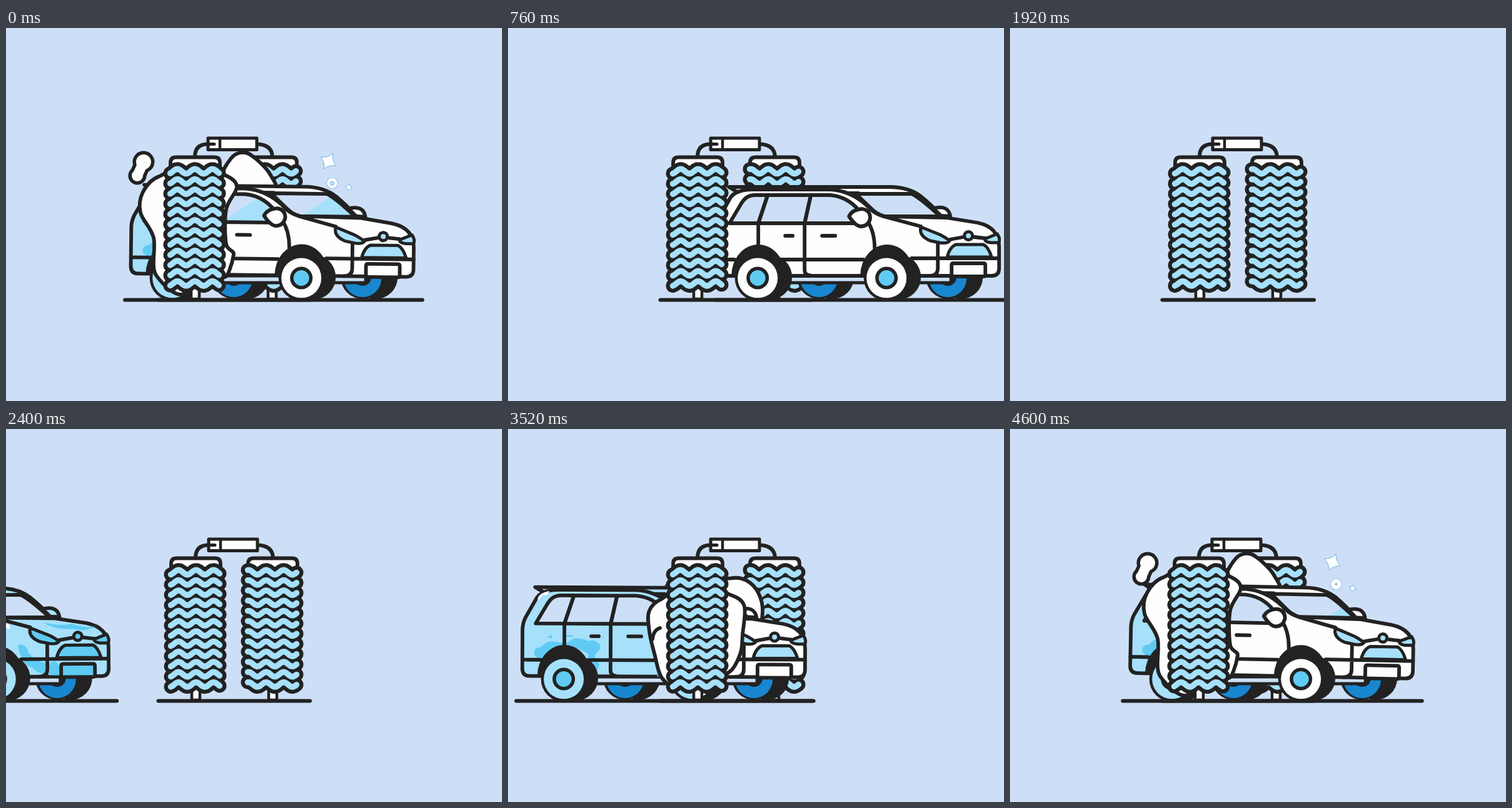
Animation, 793 px wide and 596 px high, one loop 4.64 s. Source, as an HTML page with a canvas:

```html
<!DOCTYPE html>
<html lang="en">
<head>
<meta charset="utf-8">
<title>Car wash</title>
<style>
html, body { margin: 0; width: 100%; height: 100%; overflow: hidden; background: #cddff7; }
canvas { display: block; }
</style>
</head>
<body>
<canvas id="stage" width="793" height="596"></canvas>
<script>
const ctx = document.getElementById('stage').getContext('2d');
const LOOP = 4640, WRAP = 2000, BRUSH_X = 303;
const BG = '#cddff7', INK = '#222222', WHITE = '#fefefe';
const LIGHT = '#a6e0fb', CYAN = '#5fcbf3', DEEP = '#1887cf';

const CLEAN = { paint: WHITE, trim: LIGHT, plate: WHITE };
const DIRTY = { paint: LIGHT, trim: CYAN, plate: CYAN };

// Car shapes are laid out with the front wheel at x = 605.
const HOME = 605;
const P = d => new Path2D(d);
const BODY = P('M333 322Q333 312 338 302L355 272Q363 258 392 258H515Q548 260 574 284Q588 300 605 301L700 303L750 311Q785 318 785 350V384Q785 396 773 396H345Q333 396 333 384Z');
const ROOF = P('M353 254H610Q640 254 660 269Q676 282 694 301H600L560 264H370Z');
const SCREEN = P('M556 265H645Q657 270 691 301L603 301Q590 299 577 285Z');
const REAR_GLASS = P('M354 312L373 280Q381 267 394 267H415L400 312Z');
const MID_GLASS = P('M415 267H484L474 312H400Z');
const FRONT_GLASS = P('M484 267H515Q548 270 567 300L574 312H474Z');
const SEAMS = P('M400 312V350M474 312V386Q474 395 482 395M574 308Q586 325 586 352M333 370H362M438 370H568M645 368H785M687 343V384Q687 396 674 396M600 301L660 317M706 338L728 334M745 334L763 336');
const HANDLES = P('M443 332H455M502 332H523');
const HEADLIGHTS = P('M660 318Q656 332 675 340L690 343Q702 345 706 340Q700 335 690 330ZM762 337L782 329Q788 338 784 343H772Q762 342 762 337Z');
const GRILLE = P('M702 366Q706 350 716 346H760Q768 350 773 366Z');
const PLATE = P('M712 376H760Q763 376 763 379V394Q763 397 760 397H712Q709 397 709 394V379Q709 376 712 376Z');
const FAR_MIRROR = P('M680 288Q704 282 707 301L692 300Z');
const MIRROR = P('M545 301Q550 290 566 289Q579 291 579 304Q576 317 564 317Q556 317 545 301Z');
const STAINS = P('M352 362Q350 350 362 350Q372 338 386 341Q404 346 414 336Q428 334 438 340Q448 336 456 344Q460 352 452 358Q446 364 452 370Q460 378 452 386L438 392V360Q395 332 362 372ZM372 334L380 330V336ZM400 333Q408 327 416 333ZM555 345Q562 330 580 336Q600 345 586 358Q574 370 566 396H548Q558 380 550 372Q564 366 555 345ZM680 309Q706 316 728 312Q748 320 764 316Q748 326 728 320Q700 322 680 309ZM640 345Q654 342 656 356Q668 372 684 374V392Q668 390 664 382Q646 378 640 345ZM690 376Q700 366 706 380V394H690Z');
const SHINES = P('M357 276Q356 264 376 260Q372 270 366 266ZM606 306Q630 308 627 320Q616 316 606 306ZM560 258H585L575 262Z');

// time, front wheel x, body tilt, left end of the road
const POSE = [
  [2400, -17, -.008, -280], [3080, 229, -.013, -282], [3960, 361, .022, -284],
  [4600, 465, .02, -286], [4640, 472, .012, -283], [5400, 605, 0, -275]
];
const FOAM_TIMES = [3080, 3960, 4600];
const FOAM_LEFT = [
  [290,315, 258,318, 236,338, 227,365, 234,392, 258,408, 290,408],
  [258,223, 232,226, 215,245, 225,282, 234,325, 236,390, 264,406],
  [290,236, 245,237, 219,262, 215,295, 236,335, 240,395, 290,416]
];
const FOAM_RIGHT = [
  [320,290, 352,290, 376,308, 384,338, 370,362, 350,378, 320,378],
  [320,225, 354,238, 379,256, 366,320, 373,355, 358,398, 320,405],
  [320,232, 352,236, 369,254, 352,290, 352,345, 364,362, 345,392]
];
const FOAM_BACK = [
  [330,265, 354,260, 378,275, 393,305, 405,340, 390,380, 330,390],
  [345,235, 360,217, 384,209, 407,218, 409,245, 403,263, 375,255],
  [345,245, 360,208, 382,199, 403,212, 423,235, 430,262, 380,280]
];

const mix = (a, b, k) => a + (b - a) * k;
const clamp = v => Math.max(0, Math.min(1, v));
const ramp = (t, a, b) => { const k = clamp((t - a) / (b - a)); return k * k * (3 - 2 * k); };
const pulse = (t, a, b, c, d) => ramp(t, a, b) * (1 - ramp(t, c, d));

function blend(times, rows, t) {
  let i = 0;
  while (i < times.length - 2 && t > times[i + 1]) i++;
  const k = clamp((t - times[i]) / (times[i + 1] - times[i]));
  return rows[i].map((v, j) => mix(v, rows[i + 1][j], k));
}

function carPose(t) {
  let [, x, tilt, left] = blend(POSE.map(p => p[0]), POSE, t);
  if (t < 3080) {
    const s = (3080 - t) / 1000;
    x = 229 - 150 * s - 311 * s * s;
  } else if (t > 5400) {
    const s = (t - 5400) / 1000;
    x = 605 + 175 * s + 355 * s * s;
  }
  return { x, tilt, left };
}

function paint(path, fill, width = 5.8) {
  if (fill) { ctx.fillStyle = fill; ctx.fill(path); }
  if (width) { ctx.strokeStyle = INK; ctx.lineWidth = width; ctx.stroke(path); }
}

function line(color, width, ...pts) {
  ctx.beginPath();
  for (let i = 0; i < pts.length; i += 2) ctx.lineTo(pts[i], pts[i + 1]);
  ctx.strokeStyle = color;
  ctx.lineWidth = width;
  ctx.stroke();
}

function disc(x, y, rx, color, ry = rx) {
  ctx.beginPath();
  ctx.ellipse(x, y, rx, ry, 0, 0, 7);
  ctx.fillStyle = color;
  ctx.fill();
}

function rect(x, y, w, h, width = 5) {
  const p = new Path2D();
  p.rect(x, y, w, h);
  paint(p, WHITE, width);
}

function waveLine(x, y, crest, width, color) {
  ctx.beginPath();
  for (let dx = 10.5; dx <= 90; dx += 3) {
    ctx.lineTo(x + dx, y - 3.8 * Math.cos((dx - crest) * Math.PI * 2 / 28));
  }
  ctx.strokeStyle = color;
  ctx.lineWidth = width;
  ctx.stroke();
}

function brush(x, crest, t) {
  rect(x + 44, 410, 13, 23, 4.5);
  paint(P(`M${x + 11} 226V215Q${x + 11} 206.5 ${x + 20} 206.5H${x + 81}Q${x + 90} 206.5 ${x + 90} 215V226Z`), WHITE);
  const swing = 1.2 * Math.sin(t / LOOP * Math.PI * 16);
  for (const [width, color] of [[22, INK], [9.4, LIGHT]]) {
    for (let i = 0; i < 12; i++) waveLine(x, 229 + 16.3 * i, crest + swing, width, color);
  }
}

function connector() {
  paint(P('M303 206Q303 186 323 185.5M402 185.5Q426 186 427 206'), null, 6);
  rect(324, 176, 78, 18.5);
  line(INK, 4.5, 343, 176, 343, 194);
  line(INK, 5, 325, 185.5, 334, 185.5);
}

function blob(pts, size) {
  if (size < .02) return;
  const n = pts.length / 2, p = new Path2D();
  const at = i => {
    const j = (i + n) % n;
    return [mix(BRUSH_X, pts[2 * j], size), mix(330, pts[2 * j + 1], size)];
  };
  p.moveTo(...at(0));
  for (let i = 0; i < n; i++) {
    const [a, b, c, d] = [at(i - 1), at(i), at(i + 1), at(i + 2)];
    p.bezierCurveTo(b[0] + (c[0] - a[0]) / 6, b[1] + (c[1] - a[1]) / 6,
      c[0] - (d[0] - b[0]) / 6, c[1] - (d[1] - b[1]) / 6, c[0], c[1]);
  }
  paint(p, WHITE);
}

function farWheel(x) {
  disc(x, 398, 35, INK);
  disc(x + 21, 398, 35, INK);
  disc(x, 400, 30, DEEP);
  disc(x, 398, 14, INK);
}

function wheel(x, color) {
  disc(x + 19, 398, 36, INK);
  disc(x, 399.5, 36.5, INK);
  disc(x, 399.5, 32, color);
  disc(x, 399.5, 18, INK);
  disc(x, 399.5, 12.5, CYAN);
}

function glare(glass, lead, width, base) {
  ctx.save();
  ctx.clip(glass);
  ctx.beginPath();
  ctx.moveTo(lead, base);
  ctx.lineTo(lead + 66, base - 45);
  ctx.lineTo(lead + width + 66, base - 45);
  ctx.lineTo(lead + width, base);
  ctx.fillStyle = LIGHT;
  ctx.fill();
  ctx.restore();
}

function carBody(look, u) {
  paint(ROOF, look.paint);
  paint(FAR_MIRROR, look.paint);
  paint(BODY, look.paint);
  if (look === DIRTY) {
    ctx.save();
    ctx.clip(BODY);
    paint(STAINS, CYAN, 0);
    paint(SHINES, WHITE, 0);
    ctx.restore();
  }
  const panes = [SCREEN, REAR_GLASS, MID_GLASS, FRONT_GLASS];
  for (const glass of panes) paint(glass, BG, 0);
  if (u > -200 && u < 400) {
    glare(SCREEN, 606 - u, 120, 301);
    glare(FRONT_GLASS, 480 - 2.5 * u, 170, 312);
  }
  for (const glass of panes) paint(glass);
  paint(SEAMS);
  paint(HANDLES);
  paint(HEADLIGHTS, look.trim, 5);
  paint(GRILLE, look.trim, 5);
  paint(PLATE, look.plate);
  disc(736, 332, 9, INK);
  disc(736, 332, 4, look.trim);
  paint(MIRROR, look.paint);
  for (const x of [400, 606]) {
    ctx.beginPath();
    ctx.ellipse(x, 396, 43, 50, 0, Math.PI, 0);
    ctx.fillStyle = INK;
    ctx.fill();
  }
}

function car(look, pose, u) {
  ctx.save();
  ctx.beginPath();
  if (look === DIRTY) ctx.rect(0, 0, BRUSH_X, 596);
  else ctx.rect(BRUSH_X, 0, 793, 596);
  ctx.clip();
  ctx.translate(pose.x - HOME, 0);
  farWheel(497);
  farWheel(703);
  const sill = new Path2D();
  sill.rect(400, 396, 308, 11);
  paint(sill, BG, 5);
  ctx.save();
  ctx.translate(640, 330);
  ctx.rotate(pose.tilt);
  ctx.translate(-640, -330);
  carBody(look, u);
  ctx.restore();
  wheel(399, look.paint);
  wheel(605, look.paint);
  ctx.restore();
}

function droplet(u) {
  const size = pulse(u, -420, -120, 80, 420);
  if (size < .05) return;
  const fall = Math.max(0, u) / 400;
  const x = 215 - 32 * fall, y = 224 + 70 * fall * fall;
  if (u < 0) line(INK, 6, x + 1, y + 22, 222, 254);
  const top = [x + 5 * size, y - 10 * size], tip = [x - 5 * size, y + 12 * size];
  for (const [color, inset] of [[INK, 0], [WHITE, 5.5]]) {
    disc(...top, (17.5 - inset) * size, color);
    disc(...tip, (14.5 - inset) * size, color);
    line(color, (27 - 2 * inset) * size, ...top, ...tip);
  }
}

function sparkShape(x, y, r, pinch, angle) {
  const p = new Path2D();
  for (let i = 0; i < 4; i++) {
    const a = angle + i * Math.PI / 2, m = a + Math.PI / 4;
    if (!i) p.moveTo(x + r * Math.cos(a), y + r * Math.sin(a));
    p.quadraticCurveTo(x + r * pinch * Math.cos(m), y + r * pinch * Math.sin(m),
      x - r * Math.sin(a), y + r * Math.cos(a));
  }
  ctx.fillStyle = WHITE;
  ctx.fill(p);
  ctx.strokeStyle = '#4aa6dc';
  ctx.lineWidth = .8;
  ctx.stroke(p);
}

function ring(x, y, r, hole) {
  disc(x, y, r + .6, '#4aa6dc');
  disc(x, y, r, WHITE);
  disc(x, y, hole, '#4aa6dc');
  disc(x, y, Math.max(0, hole - .8), BG);
}

function sparkles(u) {
  const first = pulse(u, -320, -60, 60, 420);
  if (first > .03) {
    sparkShape(515.5, 213, 14 * first, .4, -1.05 + u * .003);
    ring(521.5, 248, 8.5 * first, (u < 0 ? 2 : 3.5) * first);
    sparkShape(548, 254.5, 5.5 * first, .5, .3);
  }
  const second = pulse(u, 1180, 1400, 1500, 1700);
  if (second > .03) {
    sparkShape(516, 263, 10 * second, .65, .75);
    ring(521.5, 298, 7 * second, 5.5 * second);
    ring(514.5, 303.5, 4 * second, 1);
  }
}

function draw(now) {
  const t = now % LOOP;
  const s = t < WRAP ? t + LOOP : t;
  const u = s - LOOP;
  const pose = carPose(s);
  const foam = pulse(s, 2640, 3000, 4900, 5260);
  const foamAt = rows => blend(FOAM_TIMES, rows, s);
  const sway = 2 * pulse(s, 3500, 3900, 4000, 4500) - pulse(s, 4400, 4600, 4700, 5200);

  ctx.fillStyle = BG;
  ctx.fillRect(0, 0, 793, 596);
  ctx.lineCap = ctx.lineJoin = 'round';

  ctx.save();
  ctx.translate(sway, 0);
  connector();
  brush(376, 39, t);
  ctx.restore();
  blob(foamAt(FOAM_BACK), foam);
  const dome = pulse(s, 3350, 3850, 4050, 4450);
  if (dome > .02) {
    disc(265, 257, 60 * dome, INK, 55 * dome);
    disc(265, 257, 54 * dome, WHITE, 49 * dome);
  }
  droplet(u);
  car(DIRTY, pose, u);
  car(CLEAN, pose, u);
  blob(foamAt(FOAM_LEFT), foam);
  blob(foamAt(FOAM_RIGHT), foam);
  if (foam > .8 && s < 4250) {
    const k = clamp((s - 3080) / 880), y = mix(386, 286, k);
    const x = mix(233, 229, k), w = mix(5, 19, k);
    paint(P(`M${x} ${y}Q${x + 1} ${y - 14} ${x + w} ${y - 18}`));
  }
  ctx.save();
  ctx.translate(sway, 0);
  brush(253, 50, t);
  ctx.restore();
  line(INK, 6, 243.5, 434.5, 486, 434.5);
  line(INK, 6, pose.x + pose.left + 1, 434.5, pose.x + 193.5, 434.5);
  sparkles(u);
}

const start = performance.now();
function tick() {
  draw(performance.now() - start);
  requestAnimationFrame(tick);
}
tick();
</script>
</body>
</html>
```
